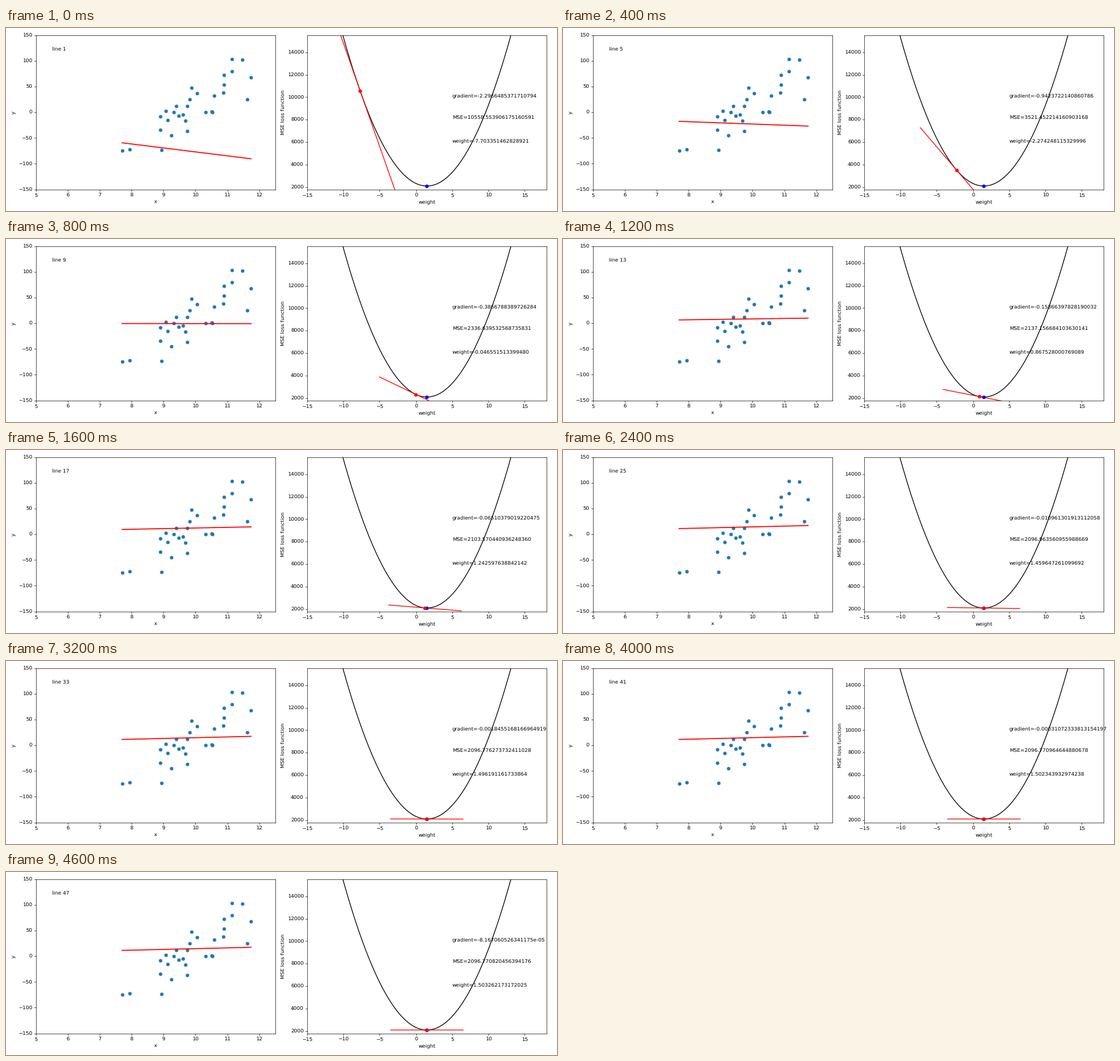
Write a matplotlib script that moves like this. It is 900 px wide and 300 px high and loops after 4.8 s.

```python
import numpy as np
import matplotlib.pyplot as plt
from matplotlib.animation import FuncAnimation

plt.rcParams.update({"font.family": "DejaVu Sans", "font.size": 10,
                     "text.hinting": "none"})

W, H = 900, 300
FRAMES, INTERVAL = 24, 200
START, RATE = -10, 0.001
STEPS_PER_FRAME = 2


def make_data(n=30, noise=30, bias=10, seed=1):
    """Noisy linear samples, moved 10 units along x."""
    rng = np.random.RandomState(seed)
    x = rng.standard_normal(n)
    y = 100 * rng.uniform() * x + bias
    y += rng.normal(scale=noise, size=n)
    order = rng.permutation(n)
    return x[order] + 10, y[order]


xs, ys = make_data()
ends = np.array([xs.min(), xs.max()])
best = np.sum(xs * ys) / np.sum(xs ** 2)


def loss(w):
    return np.mean((ys - w * xs) ** 2)


def loss_slope(w):
    return -2 * np.mean(xs * (ys - w * xs))


def descend(steps):
    """Return the weight after the given steps and the last move."""
    w = START
    for _ in range(steps):
        move = RATE * loss_slope(w)
        w = w - move
    return w, move


def add_panel(left, xlim, ylim, xticks, yticks, xlabel, ylabel):
    ax = fig.add_axes([left / W, 35.5 / H, 390.7 / W, 252.4 / H])
    ax.set(xlim=xlim, ylim=ylim, xticks=xticks, yticks=yticks,
           xlabel=xlabel, ylabel=ylabel)
    return ax


fig = plt.figure(figsize=(15, 5), dpi=60, facecolor="white")

data_ax = add_panel(49, (5, 12.5), (-150, 150), range(5, 13),
                    range(-150, 151, 50), "x", "y")
data_ax.scatter(xs, ys, color="#1f77b4")
fit, = data_ax.plot([], [], color="red", linewidth=2)
title = data_ax.text(5.5, 120, "")

loss_ax = add_panel(492.1, (-15, 18), (1800, 15500), range(-15, 16, 5),
                    range(2000, 14001, 2000), "weight", "MSE loss function")
grid = np.linspace(-15, 18, 300)
loss_ax.plot(grid, [loss(w) for w in grid], color="black")
tangent, = loss_ax.plot([], [], color="red")
loss_ax.plot([best], [loss(best)], "o", color="blue")
dot, = loss_ax.plot([], [], "o", color="red")
readouts = [loss_ax.text(5, y, "") for y in (10000, 8000, 6000)]


def update(i):
    step = STEPS_PER_FRAME * i + 1
    w, move = descend(step)
    mse = loss(w)
    reach = np.array([-5, 5])

    fit.set_data(ends, w * ends)
    title.set_text(f"line {step}")
    tangent.set_data(w + reach, mse + loss_slope(w) * reach)
    dot.set_data([w], [mse])
    lines = f"gradient={move}", f"MSE={mse:.15f}", f"weight={w:.15f}"
    for label, line in zip(readouts, lines):
        label.set_text(line)
    return [fit, title, tangent, dot, *readouts]


anim = FuncAnimation(fig, update, frames=FRAMES, interval=INTERVAL,
                     repeat=True, repeat_delay=0, blit=False)
plt.show()
```
